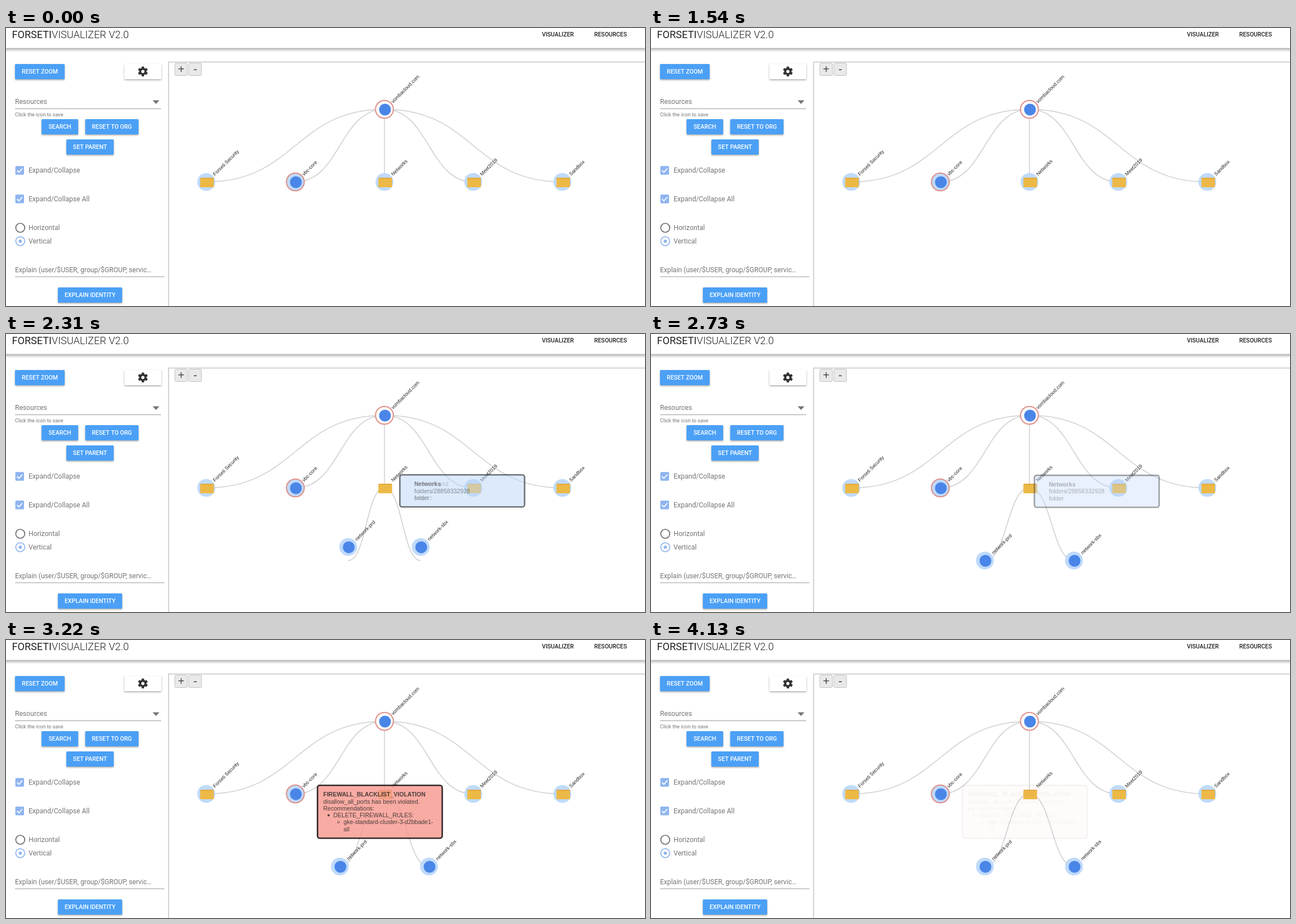
An HTML page with a canvas that plays this animation: 1133x494 px, repeating every 4200 ms.

```html
<!DOCTYPE html>
<html lang="en">
<head>
<meta charset="utf-8">
<title>Resource tree</title>
<style>
html, body { margin: 0; width: 100%; height: 100%; overflow: hidden; background: #fff; }
canvas { display: block; width: 1133px; height: 494px; }
</style>
</head>
<body>
<canvas id="stage"></canvas>
<script>
const W = 1133, H = 494, LOOP = 4200, STEP = 70;
const canvas = document.getElementById('stage');
const dpr = window.devicePixelRatio || 1;
canvas.width = W * dpr;
canvas.height = H * dpr;
const c = canvas.getContext('2d');

const UI = 'Roboto, sans-serif';
const ARIAL = '"Liberation Sans", Arial, sans-serif';
const BLUE = '#4ba0f6', PALE = '#bfdafb', RED = '#e08f89';
const GREY = '#757575', LINK = '#cfcfcf', LOGO = '#4a86e8';

const ROOT = { x: 671, y: 144.5, label: 'vombacloud.com', kind: 'logo', ring: true };
const NODES = [
  { x: 355, label: 'Forseti Security', kind: 'folder' },
  { x: 513, label: 'vbc-core', kind: 'logo', ring: true },
  { x: 671, label: 'Networks', kind: 'folder' },
  { x: 828.5, label: 'Meet2019', kind: 'folder' },
  { x: 986.5, label: 'Sandbox', kind: 'folder' }
].map(n => ({ ...n, y: 273.5 }));
const HUB = NODES[2];
const KIDS = [
  { x: 592, y: 402.5, label: 'network-prd', kind: 'logo' },
  { x: 750, y: 402.5, label: 'network-sbx', kind: 'logo' }
];
const OPEN_AT = 2070, OPEN_FOR = 375;

// opacity over time, as [ms, value] pairs
const BLUE_FADE = [[1820, 0], [1960, 0.5], [2100, 0.75], [2170, 0.7], [2240, 0.5],
  [2310, 0.53], [2450, 0.75], [2590, 0.75], [2730, 0.35], [2870, 0]];
const RED_FADE = [[3010, 0], [3220, 0.8], [3290, 0.88], [3780, 0.88], [3920, 0.6], [4130, 0.04]];

function at(keys, t) {
  if (t <= keys[0][0]) return keys[0][1];
  for (let i = 1; i < keys.length; i++) {
    const [t0, a] = keys[i - 1], [t1, b] = keys[i];
    if (t <= t1) return a + (b - a) * (t - t0) / (t1 - t0);
  }
  return keys[keys.length - 1][1];
}

function cubicInOut(p) {
  return p < 0.5 ? 4 * p ** 3 : 1 - (2 - 2 * p) ** 3 / 2;
}

function text(s, x, y, font, color, align = 'left') {
  c.font = font;
  c.fillStyle = color;
  c.textAlign = align;
  c.textBaseline = 'alphabetic';
  c.fillText(s, x, y);
}

function box(x, y, w, h, r, fill, stroke, lw = 1) {
  c.beginPath();
  c.roundRect(x, y, w, h, r);
  if (fill) { c.fillStyle = fill; c.fill(); }
  if (stroke) { c.strokeStyle = stroke; c.lineWidth = lw; c.stroke(); }
}

function disc(x, y, r, fill, stroke, lw = 1) {
  c.beginPath();
  c.arc(x, y, r, 0, Math.PI * 2);
  if (fill) { c.fillStyle = fill; c.fill(); }
  if (stroke) { c.strokeStyle = stroke; c.lineWidth = lw; c.stroke(); }
}

function line(pts, color, lw = 1) {
  c.beginPath();
  pts.forEach(([x, y]) => c.lineTo(x, y));
  c.strokeStyle = color;
  c.lineWidth = lw;
  c.stroke();
}

function raised(x, y, w, h, fill) {
  c.save();
  c.shadowColor = 'rgba(0,0,0,0.35)';
  c.shadowBlur = 3 * dpr;
  c.shadowOffsetY = 1.4 * dpr;
  box(x, y, w, h, 1.5, fill);
  c.restore();
}

function button(label, x, y, w) {
  raised(x, y, w, 27, BLUE);
  text(label, x + w / 2, y + 16.5, '500 10.5px ' + UI, '#fff', 'center');
}

function gear(x, y) {
  c.save();
  c.translate(x, y);
  disc(0, 0, 4.7, null, '#333', 3.8);
  for (let i = 0; i < 6; i++) {
    box(-2.2, -8.8, 4.4, 4, 0.8, '#333');
    c.rotate(Math.PI / 3);
  }
  c.restore();
}

function header() {
  const g = c.createLinearGradient(0, 35, 0, 43);
  g.addColorStop(0, '#fff');
  g.addColorStop(0.15, '#b4b4b4');
  g.addColorStop(0.5, '#dcdcdc');
  g.addColorStop(1, '#fff');
  c.fillStyle = g;
  c.fillRect(0, 35, W, 8);
  text('FORSETI', 10.5, 18, '400 18.1px ' + UI, '#222');
  const w = c.measureText('FORSETI').width;
  text('VISUALIZER V2.0', 10.5 + w, 18, '300 18.1px ' + UI, '#222');
  text('VISUALIZER', 978.5, 15, '500 10.4px ' + UI, '#222', 'center');
  text('RESOURCES', 1072, 15, '500 10.4px ' + UI, '#222', 'center');
}

function checkbox(label, y) {
  box(16.5, y - 8, 15.5, 15.5, 1.8, '#8fb5f0');
  line([[19.5, y], [22.8, y + 3.3], [29, y - 3.5]], '#fff', 1.8);
  text(label, 40, y + 4, '12.1px ' + UI, GREY);
}

function radio(label, y, on) {
  disc(25.3, y, 8, null, on ? '#8fb5f0' : '#6b6b6b', 1.7);
  if (on) disc(25.3, y, 2.9, '#8fb5f0');
  text(label, 40, y + 4, '12.1px ' + UI, GREY);
}

function sidebar() {
  button('RESET ZOOM', 16, 64, 88);
  raised(210, 63.5, 65.5, 27.5, '#fff');
  gear(242.7, 77.2);

  text('Resources', 16, 135, '12.1px ' + UI, GREY);
  c.beginPath();
  c.moveTo(260, 128.5);
  c.lineTo(272, 128.5);
  c.lineTo(266, 135);
  c.fillStyle = GREY;
  c.fill();
  line([[16, 143.5], [275, 143.5]], '#999');
  text('Click the icon to save', 16, 157, '9.1px ' + UI, GREY);

  button('SEARCH', 63, 162, 65);
  button('RESET TO ORG', 140.5, 162, 94.5);
  button('SET PARENT', 107, 198, 84);
  checkbox('Expand/Collapse', 253.2);
  checkbox('Expand/Collapse All', 304);
  radio('Horizontal', 355, false);
  radio('Vertical', 378.8, true);

  text('Explain (user/$USER, group/$GROUP, servic…', 16, 434, '12.1px ' + UI, GREY);
  line([[16, 442], [281, 442]], '#999');
  button('EXPLAIN IDENTITY', 92, 461, 114);
}

function zoomButton(sign, x) {
  box(x, 62.5, 22.5, 22, 2.5, '#e9e9e9', '#c2c2c2');
  text(sign, x + 11.3, 79.5, '20px ' + ARIAL, '#444', 'center');
}

function link(a, x, y) {
  const mid = (a.x + x) / 2;
  c.beginPath();
  c.moveTo(a.x, a.y);
  c.bezierCurveTo(mid, a.y, mid, y, x, y);
  c.strokeStyle = LINK;
  c.lineWidth = 1.5;
  c.stroke();
}

function node(n, x = n.x, y = n.y, halo = PALE) {
  if (halo) disc(x, y, 15.8, halo);
  if (n.ring) disc(x, y, 15.8, null, RED, 2);
  if (n.kind === 'folder') {
    box(x - 10.5, y - 7.5, 24, 17, 1, '#e2aa3c');
    box(x - 10.5, y - 5.5, 23.5, 15, 1, '#edb946');
  } else {
    disc(x + 1, y + 0.5, 10.5, LOGO);
  }
  c.save();
  c.translate(x + 15.5, y - 10.5);
  c.rotate(-Math.PI / 4);
  text(n.label, 0, 0, '8.8px ' + ARIAL, '#222');
  c.restore();
}

function tree(t) {
  const open = t >= OPEN_AT;
  const k = cubicInOut(Math.min(1, Math.max(0, (t - OPEN_AT) / OPEN_FOR)));
  const kids = open ? KIDS.map(n => ({
    ...n,
    x: HUB.x + (n.x - HUB.x) * k,
    y: HUB.y + (n.y - HUB.y) * k
  })) : [];
  NODES.forEach(n => link(ROOT, n.x, n.y));
  kids.forEach((n, i) => link(HUB, n.x, KIDS[i].y));
  kids.forEach(n => node(n));
  node(ROOT, ROOT.x, ROOT.y, '#fff');
  NODES.forEach(n => node(n, n.x, n.y, open && n === HUB ? null : PALE));
}

function panel(x, y, h, fill) {
  box(x + 1.3, y + 1.3, 221.2, h - 2.6, 4, fill, '#000', 2.6);
}

function blueTip(t) {
  const alpha = at(BLUE_FADE, t);
  if (!alpha) return;
  const x = t < 2660 ? 697 : 678.5;
  const y = t < 2170 ? 244 : t < 2660 ? 249 : 249.8;
  c.save();
  c.globalAlpha = alpha;
  panel(x, y, 59.5, '#bdd7f9');
  text('Networks', x + 27, y + 21.3, 'bold 10.5px ' + ARIAL, '#333');
  text('folders/28858332928', x + 27, y + 33.6, '10.5px ' + ARIAL, '#333');
  text('folder', x + 27, y + 45.9, '10.5px ' + ARIAL, '#333');
  // residue of the tip for the child passing under the pointer
  const ghost = t < 2170 ? 0 : at([[2170, 0.35], [2310, 0.22], [2450, 0]], t);
  if (ghost) {
    c.globalAlpha = ghost;
    text('network-prd', x + 27, y + 21.3, 'bold 10.5px ' + ARIAL, '#555');
    text('project', x + 27, y + 45.9, '10.5px ' + ARIAL, '#555');
  }
  c.restore();
}

function redTip(t) {
  const alpha = at(RED_FADE, t);
  if (!alpha) return;
  const x = 551, font = '10.5px ' + ARIAL, ink = '#222';
  const row = i => 278.2 + i * 12.3;
  c.save();
  c.globalAlpha = alpha;
  panel(x, 257, 96.5, '#f7978d');
  text('FIREWALL_BLACKLIST_VIOLATION', x + 11.5, row(0), 'bold ' + font, ink);
  text('disallow_all_ports has been violated.', x + 11.5, row(1), font, ink);
  text('Recommendations:', x + 11.5, row(2), font, ink);
  disc(x + 21, row(3) - 3.6, 1.9, ink);
  text('DELETE_FIREWALL_RULES:', x + 29.5, row(3), font, ink);
  disc(x + 38.5, row(4) - 3.6, 1.7, null, ink, 0.8);
  text('gke-standard-cluster-3-d2bbade1-', x + 47.5, row(4), font, ink);
  text('all', x + 47.5, row(5), font, ink);
  c.restore();
}

function draw(t) {
  c.setTransform(dpr, 0, 0, dpr, 0, 0);
  c.fillStyle = '#fff';
  c.fillRect(0, 0, W, H);
  header();
  sidebar();
  line([[W, 60.5], [288.3, 60.5], [288.3, H]], '#c4c4c4', 1.5);
  zoomButton('+', 299.3);
  zoomButton('-', 324.2);
  tree(t);
  blueTip(t);
  redTip(t);
}

const start = performance.now();
function tick() {
  const t = (performance.now() - start) % LOOP;
  draw(Math.floor(t / STEP) * STEP);
  requestAnimationFrame(tick);
}
tick();
</script>
</body>
</html>
```
